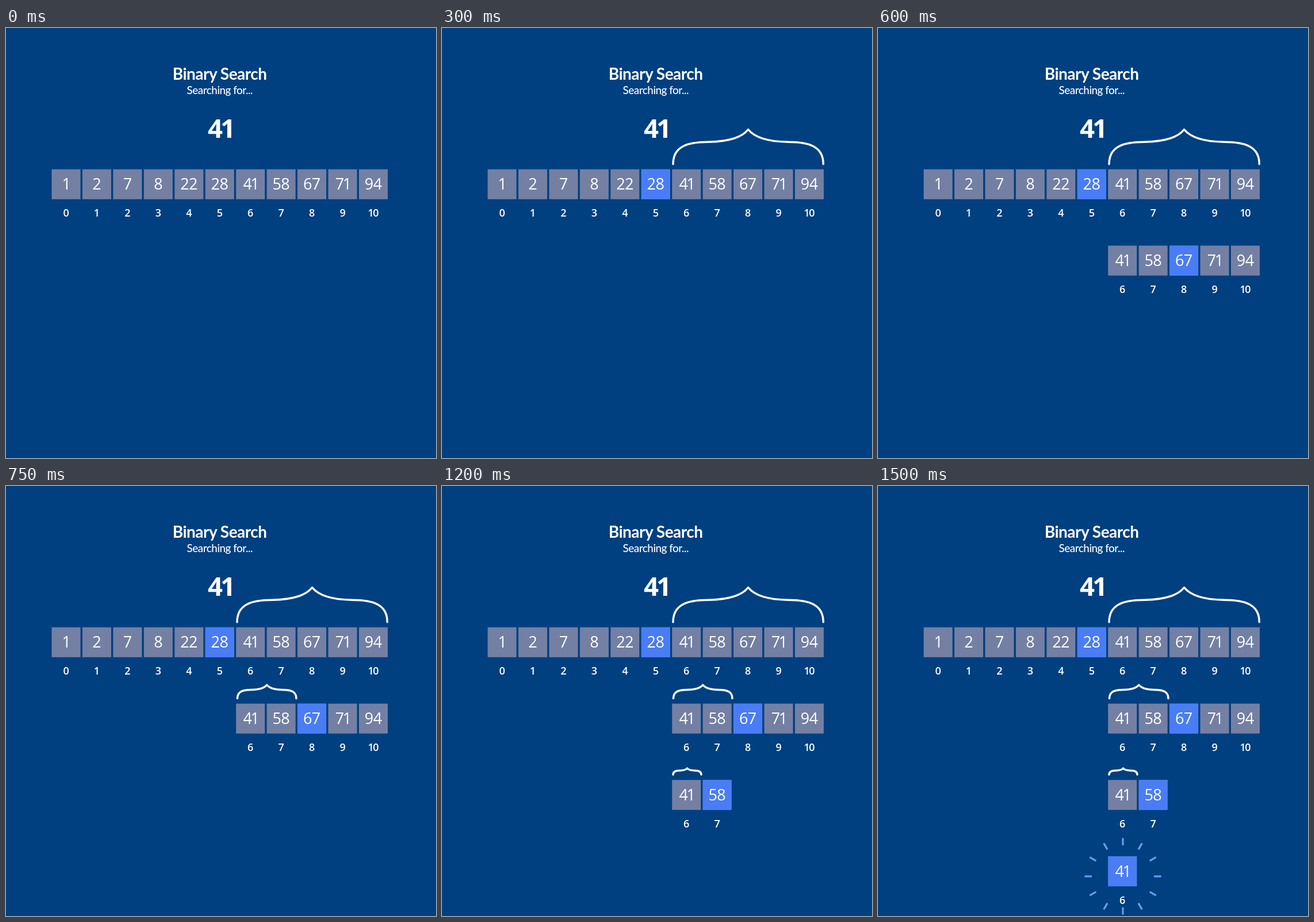
An HTML page that plays this animation: 748 px wide and 748 px high, repeating every 1650 ms.

```html
<!DOCTYPE html>
<html lang="en">
<head>
<meta charset="utf-8">
<title>Binary Search</title>
<style>
  html, body { margin: 0; height: 100%; overflow: hidden; background: #004080; }
  svg { display: block; width: 100vw; height: 100vh; }
  text { fill: #fff; text-anchor: middle; font-family: "Open Sans", "Noto Sans", sans-serif; }
  .title { font: 700 28px Lato, sans-serif; letter-spacing: -.5px; }
  .sub { font: 500 18.8px Lato, sans-serif; letter-spacing: -.45px; }
  .goal { font-size: 45.5px; font-weight: 700; letter-spacing: -4px; }
  .value { font-size: 27px; letter-spacing: -.6px; font-variant-numeric: proportional-nums; }
  .index { font-size: 18px; font-weight: 600; letter-spacing: -1.5px; }
  .brace { fill: none; stroke: #fff; stroke-width: 3.5; stroke-linecap: round; stroke-linejoin: round; }
</style>
</head>
<body>
<svg id="stage" viewBox="0 0 748 748">
  <text class="title" x="371.7" y="89.5">Binary Search</text>
  <text class="sub" x="371.8" y="115">Searching for...</text>
  <text class="goal" x="373" y="191">41</text>
</svg>
<script>
const STEP = 150, LOOP = 1650;
const GREY = "#7480a3", BLUE = "#4a7df5";
const values = [1, 2, 7, 8, 22, 28, 41, 58, 67, 71, 94];
const stage = document.getElementById("stage");
const timed = [];

function add(tag, attrs, text = "", parent = stage) {
  const el = document.createElementNS("http://www.w3.org/2000/svg", tag);
  for (const key in attrs) el.setAttribute(key, attrs[key]);
  el.textContent = text;
  return parent.appendChild(el);
}

// A group that is visible from the given step until the loop ends.
function groupFrom(step) {
  const el = add("g", {});
  timed.push({ el, step });
  return el;
}

function cell(group, i, top, color) {
  const x = 79.5 + 53.45 * i;
  add("rect", { x, y: top, width: 50, height: 52, fill: color }, "", group);
  add("text", { class: "value", x: x + 24.7, y: top + 35.5 }, values[i], group);
}

function row(n, first, last, mid, step) {
  const top = 245.8 + 132.8 * n;
  const cells = groupFrom(step);
  for (let i = first; i <= last; i++) {
    cell(cells, i, top, GREY);
    add("text", { class: "index", x: 103.8 + 53.45 * i, y: top + 82.4 }, i, cells);
  }
  cell(groupFrom(step + 1), mid, top, BLUE);
}

function brace(left, right, top, bottom, step) {
  const half = (right - left) / 2;
  const p = (u, v) => `${left + half * u} ${bottom + (top - bottom) * v} `;
  const d = "M" + p(0, 0) +
    "C" + p(0, .5) + p(.18, .64) + p(.47, .64) +
    "C" + p(.75, .65) + p(.92, .78) + p(1, 1) +
    "C" + p(1.08, .78) + p(1.25, .65) + p(1.53, .64) +
    "C" + p(1.82, .64) + p(2, .5) + p(2, 0);
  add("path", { class: "brace", d }, "", groupFrom(step));
}

function rays(cx, cy, step) {
  const group = groupFrom(step);
  let d = "";
  for (let k = 0; k < 12; k++) {
    const a = k * Math.PI / 6, c = Math.cos(a), s = Math.sin(a);
    d += `M${cx + 54 * c} ${cy + 54 * s}L${cx + 66.5 * c} ${cy + 66.5 * s}`;
  }
  add("path", { d, stroke: "#8db0ff", "stroke-width": 3 }, "", group);
  add("path", { d, stroke: BLUE, "stroke-width": 1 }, "", group);
}

row(0, 0, 10, 5, 0);
brace(402, 663.3, 176.5, 236.8, 2);
row(1, 6, 10, 8, 3);
brace(402.5, 505, 346, 369.5, 5);
row(2, 6, 7, 7, 6);
brace(402, 451, 491, 502, 8);
row(3, 6, 6, 6, 9);
rays(426, 679, 10);

function draw(now) {
  const current = Math.floor(now % LOOP / STEP);
  for (const { el, step } of timed)
    el.setAttribute("visibility", current >= step ? "visible" : "hidden");
}

const start = performance.now();
function tick() {
  draw(performance.now() - start);
  requestAnimationFrame(tick);
}
tick();
</script>
</body>
</html>
```
